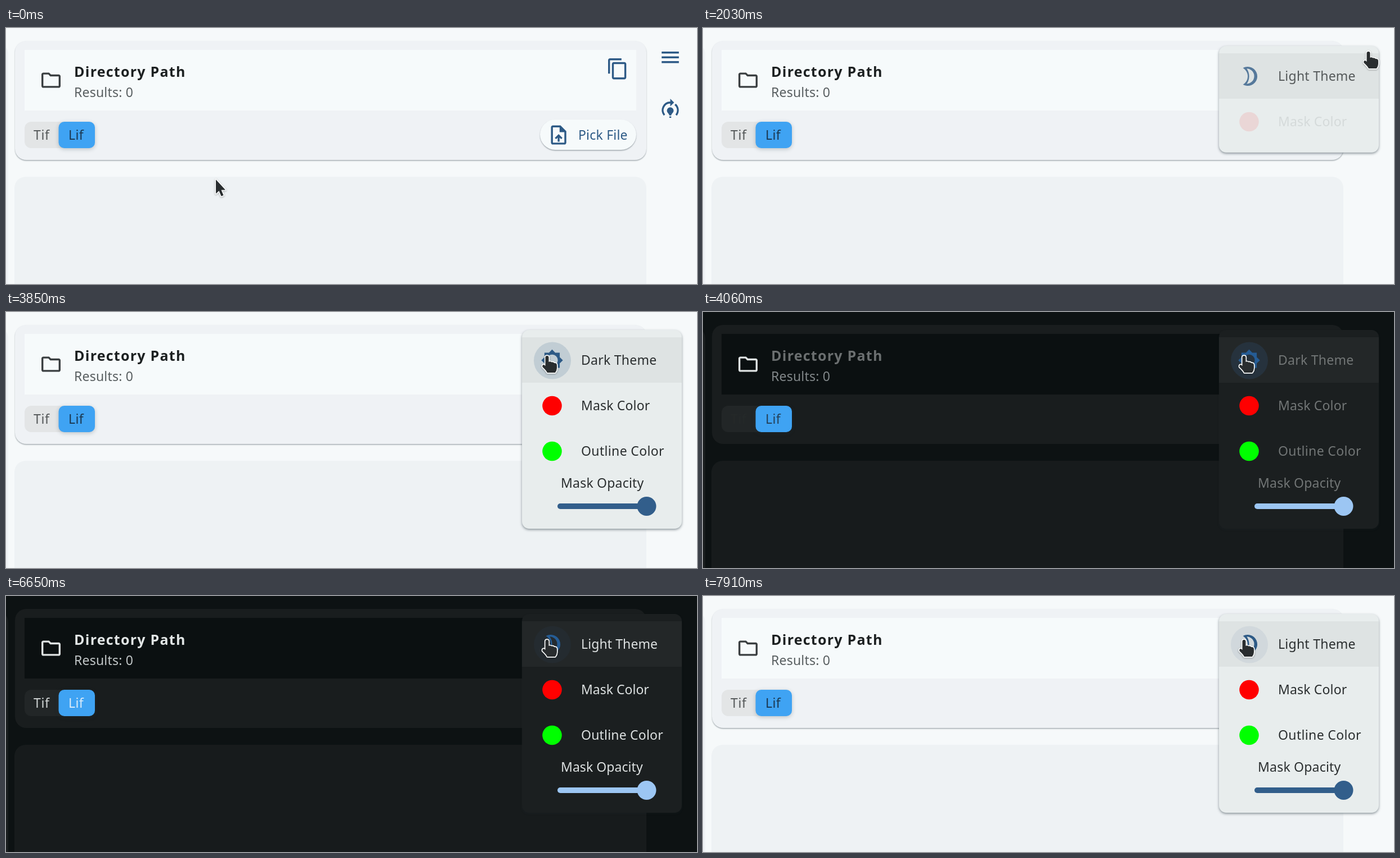
Animation of 1228 by 456 pixels, one loop 8000 ms. Source, as an HTML page with a canvas:

```html
<!DOCTYPE html>
<html lang="en">
<head>
<meta charset="utf-8">
<title>Theme menu</title>
<style>
html, body { margin: 0; width: 1228px; height: 456px; overflow: hidden; background: #f6f9fa; }
canvas { display: block; }
</style>
</head>
<body>
<canvas id="stage" width="1228" height="456"></canvas>
<script>
const ctx = document.getElementById('stage').getContext('2d');
const LOOP = 8000, STEP = 70;
const FONT = '"Noto Sans", "Open Sans", sans-serif';

// [light, dark]
const C = {
  page: ['#f6f9fa', '#0d1213'],
  card: ['#eff2f5', '#191d1e'],
  inner: ['#f6fafb', '#0b1011'],
  panel: ['#eef2f4', '#171b1c'],
  menu: ['#e8eded', '#1b1f20'],
  row: ['#dee3e3', '#232728'],
  toggle: ['#e3e5e6', '#222627'],
  title: ['#1c2021', '#e2e6e6'],
  sub: ['#585e60', '#c2c7c8'],
  label: ['#2a2e2f', '#dde1e1'],
  lif: ['#1b3750', '#dcecf9'],
  folder: ['#3a3e40', '#dfe3e3'],
  accent: ['#2d5a86', '#9cc6f3'],
  slider: ['#325e8b', '#9cc6f3'],
  mode: ['#2d5a86', '#255c95']
};

const icon = d => new Path2D(d);
const ICON = {
  folder: icon('M9.17 6l2 2H20v10H4V6h5.17M10 4H4c-1.1 0-2 .9-2 2v12c0 1.1.9 2 2 2h16c1.1 0 2-.9 2-2V8c0-1.1-.9-2-2-2h-8l-2-2z'),
  copy: icon('M16 1H4c-1.1 0-2 .9-2 2v14h2V3h12V1zm3 4H8c-1.1 0-2 .9-2 2v14c0 1.1.9 2 2 2h11c1.1 0 2-.9 2-2V7c0-1.1-.9-2-2-2zm0 16H8V7h11v14z'),
  menu: icon('M3 18h18v-2H3v2zm0-5h18v-2H3v2zm0-7v2h18V6H3z'),
  upload: icon('M14 2H6c-1.1 0-2 .9-2 2v16c0 1.1.9 2 2 2h12c1.1 0 2-.9 2-2V8l-6-6zm4 18H6V4h7v5h5v11zM8 15l1.4 1.4L11 14.8V19h2v-4.2l1.6 1.6L16 15l-4-4z'),
  train: icon('M15.5 13.5c0 2-2.5 3.5-2.5 5h-2c0-1.5-2.5-3-2.5-5a3.5 3.5 0 0 1 7 0zm-2.5 6h-2V21h2zm6-6.5c0 1.7-.6 3.2-1.6 4.4l1.4 1.4A9 9 0 0 0 17.8 6.2l-1.4 1.4A7 7 0 0 1 19 13zm-3-8l-4-4v3a9 9 0 0 0-6.8 14.8l1.4-1.4A7 7 0 0 1 12 6v3z'),
  moon: icon('M9.5 4a8 8 0 0 1-1 15.9C10.1 17.8 11 15 11 12s-.9-5.8-2.5-7.9l1-.1m0-2c-1.8 0-3.5.5-5 1.35a10 10 0 0 1 0 17.3A10 10 0 1 0 9.5 2z'),
  sun: icon('M20 15.3L23.3 12 20 8.7V4h-4.7L12 .7 8.7 4H4v4.7L.7 12 4 15.3V20h4.7l3.3 3.3 3.3-3.3H20zM12 18a6 6 0 1 1 0-12 6 6 0 0 1 0 12z')
};
const ARROW = icon('M0 0V25L5.5 20 9.5 29.5 13.5 28 9.5 18.5H17Z');
const HAND = icon('M-3.5 2Q-3.5-1-.5-1T2.5 2V10Q5 8.5 7.5 10.5 10 9.5 12.5 12 17 11.5 17 16V21Q17 25 14 29H0Q-2 25-8.5 19-9.5 15-6 15L-3.5 17Z');

const clamp = v => Math.max(0, Math.min(1, v));
const ramp = (t, a, b) => clamp((t - a) / (b - a));
const ease = v => v * v * (3 - 2 * v);
const rgb = h => [1, 3, 5].map(i => parseInt(h.slice(i, i + 2), 16));

function mix([a, b], k) {
  const p = rgb(a), q = rgb(b);
  return `rgb(${p.map((v, i) => Math.round(v + (q[i] - v) * k)).join()})`;
}

function box(x, y, w, h, r, fill, shade = 0, blur = 3, dy = 2) {
  ctx.save();
  ctx.shadowColor = `rgba(40,55,65,${shade})`;
  ctx.shadowBlur = blur;
  ctx.shadowOffsetY = dy;
  ctx.fillStyle = fill;
  ctx.beginPath();
  ctx.roundRect(x, y, w, h, r);
  ctx.fill();
  ctx.restore();
}

function disc(x, y, r, fill) {
  ctx.fillStyle = fill;
  ctx.beginPath();
  ctx.arc(x, y, r, 0, 7);
  ctx.fill();
}

function text(s, x, y, fill, font = '400 23px', gap = 0.1) {
  ctx.font = `${font} ${FONT}`;
  ctx.letterSpacing = gap + 'px';
  ctx.fillStyle = fill;
  ctx.fillText(s, x, y);
}

function glyph(name, x, y, fill) {
  ctx.save();
  ctx.translate(x, y);
  ctx.scale(1.7, 1.7);
  ctx.fillStyle = fill;
  ctx.fill(ICON[name], 'evenodd');
  ctx.restore();
}

// Moments where the picture rests longer than one step.
const HOLDS = [[2030, 2170], [3640, 3850], [6650, 6790], [6860, 7000]];
function settle(ms) {
  const t = Math.floor(ms / STEP) * STEP;
  const h = HOLDS.find(([a, b]) => t >= a && t < b);
  return h ? h[0] : t;
}

// Dark amount; text colours follow with a delay.
function darkness(t, lag, span) {
  return ramp(t, 3870 + lag, 3870 + lag + span) - ramp(t, 6705 + lag, 6705 + lag + span);
}

function drawPage(t, b, k, s) {
  const accent = mix(C.accent, b), light = 1 - b;
  ctx.fillStyle = mix(C.page, b);
  ctx.fillRect(0, 0, 1228, 456);
  box(-40, 28, 44, 460, 18, mix(C.card, b));
  box(16, 23, 1122, 212, 20, mix(C.card, b), 0.4 * light, 2, 1.5);
  ctx.fillStyle = mix(C.inner, b);
  ctx.fillRect(33, 39, 1087, 108);
  box(15, 265, 1123, 230, 20, mix(C.panel, b));

  glyph('folder', 59.6, 72.6, mix(C.folder, b));
  text('Directory Path', 121, 87, mix(C.title, k), '600 25px', 1.25);
  text('Results: 0', 121, 123, mix(C.sub, k), '400 23px', 0.2);

  box(33, 167, 125, 47, 12, mix(C.toggle, b));
  ctx.globalAlpha = 0.72 + 0.2 * s;
  text('Tif', 49, 199, mix(C.title, s), '400 23px', 0.6);
  ctx.globalAlpha = 1;
  box(93.5, 167, 64.5, 47, 10, '#3fa3f3', 0.25, 7, 2);
  text('Lif', 111, 199, mix(C.lif, s), '500 23px', 0.4);

  glyph('copy', 1066.6, 52.3, accent);
  box(949, 163, 171, 54, 27, mix(C.inner, b), 0.4 * light, 2, 1.5);
  glyph('upload', 961.7, 170.2, accent);
  text('Pick File', 1017, 199, accent, '400 23px', 0.2);

  const hover = 0.08 * ramp(t, 840, 980) * (1 - ramp(t, 1850, 1960));
  if (hover) disc(1180.5, 52, 30, `rgba(50,94,139,${hover})`);
  glyph('menu', 1160.1, 31.8, accent);
  glyph('train', 1160.1, 124.3, accent);
}

function drawMenu(t, b, k) {
  const p = ramp(t, 1913, 2213);
  if (!p) return;
  const unit = 1 / 5.5;
  const w = 284 * clamp(p / unit), h = 354 * clamp(p / (unit * 4));
  const fade = i => clamp((p - unit * (i + 1)) / (unit * 1.5));
  const slider = mix(C.slider, b);
  const day = t < 3850 || t >= 6650;
  const label = (s, x, y, gap) =>
    text(s, x, y, mix(C.label, k), k > 0.5 ? '500 23px' : '400 23px', gap - 0.15 * (k > 0.5));

  ctx.save();
  ctx.globalAlpha = clamp(p * 3);
  box(1201 - w, 32, w, h, 13, mix(C.menu, b), 0.4 * (1 - b) + 0.1, 4, 2);
  ctx.beginPath();
  ctx.roundRect(1201 - w, 32, w, h, 13);
  ctx.clip();
  ctx.fillStyle = mix(C.row, b);
  ctx.fillRect(917, 45, 284, 81);

  ctx.globalAlpha = fade(0);
  const hover = 0.08 * ramp(t, 2730, 2870);
  const splash = at => ramp(t, at, at + 120) * (1 - ramp(t, at + 260, at + 520));
  const glow = hover + 0.15 * (splash(3780) + splash(6660));
  if (hover) disc(971, 86.5, 33, `rgba(50,94,139,${glow})`);
  if (day) glyph('moon', 951.9, 65.6, mix(C.mode, b));
  else glyph('sun', 950.1, 65.6, mix(C.mode, b));
  label(day ? 'Light Theme' : 'Dark Theme', 1022, 94, 0.25);

  ctx.globalAlpha = fade(1);
  disc(970.5, 167, 17.3, '#ff0000');
  label('Mask Color', 1022, 175, 0.15);

  ctx.globalAlpha = fade(2);
  disc(970.5, 248, 17.3, '#00ff00');
  label('Outline Color', 1022, 256, 0.35);

  ctx.globalAlpha = fade(3);
  label('Mask Opacity', 986, 313, 0.2);
  box(980, 341, 160, 10, 5, slider);
  disc(1138.5, 346, 17, slider);
  ctx.restore();
}

function drawCursor(t) {
  const go = ease(ramp(t, 640, 900)), back = ease(ramp(t, 2300, 2780));
  const x = 373 + 810 * go - 221 * back;
  const y = 270 - 227 * go + 36 * back;
  const shape = go > 0.97 ? HAND : ARROW;
  ctx.save();
  ctx.translate(x, y);
  ctx.lineJoin = 'round';
  ctx.lineWidth = 3.4;
  ctx.strokeStyle = '#fbfdfd';
  ctx.shadowColor = 'rgba(0,0,0,.3)';
  ctx.shadowBlur = 3;
  ctx.shadowOffsetY = 1;
  ctx.stroke(shape);
  ctx.shadowColor = 'transparent';
  ctx.fillStyle = '#292d2f';
  ctx.fill(shape);
  ctx.restore();
}

function frame(now) {
  const t = settle(now % LOOP);
  const b = darkness(t, 0, 190), k = darkness(t, 110, 200), s = darkness(t, 180, 200);
  drawPage(t, b, k, s);
  drawMenu(t, b, k);
  drawCursor(t);
  requestAnimationFrame(frame);
}
requestAnimationFrame(frame);
</script>
</body>
</html>
```
